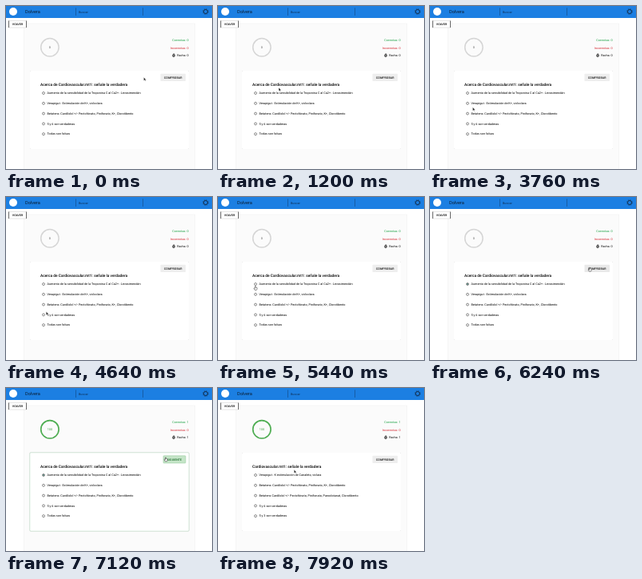
These frames come from a looping animation (258x204 px, 8 s). An HTML page:

```html
<!DOCTYPE html>
<html lang="es">
<head>
<meta charset="utf-8">
<style>
  html, body { margin: 0; width: 100%; height: 100%; overflow: hidden; background: #fff; }
  svg { display: block; width: 100vw; height: 100vh; }
  text { font: 3.8px Roboto, sans-serif; fill: #000; text-rendering: geometricPrecision; }
  .title { font-size: 4.83px; font-weight: 500; }
  .button { font-size: 3.6px; font-weight: 500; letter-spacing: .08px; text-anchor: middle; }
  .count { font-size: 3.75px; text-anchor: end; }
  .card { filter: drop-shadow(0 .6px .6px #0007); }
  .card.right { filter: drop-shadow(0 .6px .6px #1b4a2a88); stroke: #b9dfc0; stroke-width: .4px; }
</style>
</head>
<body>
<svg viewBox="0 0 258 204">
  <rect width="258" height="204" fill="#fff"/>
  <rect x="22.3" y="22" width="214.4" height="190" fill="#fbfbfb" stroke="#f0f0f0" stroke-width=".6"/>

  <rect width="258" height="15" fill="#1c7fe2"/>
  <circle cx="9" cy="7" r="5" fill="#fff"/>
  <text x="24" y="9" style="font-size:5.6px;fill:#0b1d31">Dolvera</text>
  <path d="M87.5 2.4V12M171.5 2.4V12" stroke="#154f8e" stroke-width=".7"/>
  <text x="91" y="8.6" style="fill:#0f2f55">Buscar</text>
  <g fill="none" stroke="#122f50">
    <circle cx="250" cy="7" r="2.5" stroke-width="1"/>
    <circle cx="250" cy="7" r="3.3" stroke-width=".8" stroke-dasharray="1.3 1.29"/>
  </g>

  <rect x="3.5" y="18.5" width="22" height="8.5" fill="#fff" stroke="#ccc" stroke-width=".5"/>
  <path d="M3.5 18.5V27M25.5 18.5V27" stroke="#333" stroke-width=".7"/>
  <text class="button" x="14.5" y="24.2">VOLVER</text>

  <circle cx="54.9" cy="51.8" r="11.2" fill="none" stroke="#d5d5d5" stroke-width="1.5"/>
  <circle id="ring" cx="54.9" cy="51.8" r="11.2" fill="none" stroke="#4caf50" stroke-width="1.6"
          pathLength="100" transform="rotate(-90 54.9 51.8)"/>
  <text id="score" x="54.9" y="53.2" text-anchor="middle"></text>

  <text id="hits" class="count" x="228.5" y="44.4" style="fill:#0f9d3a"></text>
  <text class="count" x="228.5" y="53.5" style="fill:#d3202a">Incorrectas: 0</text>
  <text id="streak" class="count" x="228.5" y="63"></text>
  <path d="M210 59.5c2 1.5 2 4.1 0 4.1s-1.8-2 0-4.1z" fill="#777" stroke="#222" stroke-width=".6"/>

  <rect id="card" class="card" x="30" y="81" width="199" height="98" rx=".8" fill="#fff"/>
  <rect id="action" y="84.8" height="9.2" rx=".8" stroke-width=".5"/>
  <text id="label" class="button" y="90.6"></text>
  <text id="question" class="title" x="43" y="100.1"></text>
  <g id="options"></g>

  <g id="cursor" stroke="#fff" stroke-width=".4" fill="#111">
    <path id="arrow" d="M0 0V4.2L1 3.3 1.7 4.8 2.4 4.5 1.8 3.1H3.1Z"/>
    <path id="hand" d="M-.5 0Q0-.5.5 0V1.5L2.2 2V3.5L1.5 4.8H-.7L-2 2.7-1.4 2.2-.5 2.9Z"
          fill="#fff" stroke="#222" stroke-width=".5"/>
  </g>
</svg>
<script>
const $ = id => document.getElementById(id);
const LOOP = 8000, SELECT = 5520, CHECK = 6560, NEXT = 7280;

const quizzes = [
  ["Acerca de Cardiovascular.mt1: señale la verdadera", [
    "Aumento de la sensibilidad de la Troponina C al Ca2+ : Levosimendán",
    "Verapigut : Estimulación de K+, vicloclara",
    "Betatens: Cardilolol +/- Pectofónato, Pinifonato, K+, Clorotibento",
    "5 y 6 son verdaderas",
    "Todas son falsas"]],
  ["Cardiovascular.mt1: señale la verdadera", [
    "Verapigut : K estimulación de Canaleto, viclara",
    "Betatens: Cardilolol +/- Pectofónato, Pinifonato, K+, Clorotibento",
    "Betatens Cardilolol +/- Pectofónato, Pinifonato, Panodotanat, Clorotibento",
    "5 y 6 son verdaderas",
    "5 y 3 son verdaderas"]]
];

// time, x, y of the pointer tip
const path = [
  [0, 172.5, 89.3], [80, 172, 89.5], [480, 120, 100], [880, 80, 104],
  [1040, 89, 101], [1200, 76, 102.2], [1760, 51, 97], [1840, 51, 98],
  [2640, 56.5, 111.5], [2720, 56.5, 111.7], [3120, 54, 124], [3520, 54, 124],
  [4400, 51, 139.5], [4640, 50.3, 143.5], [5280, 46.8, 112], [5680, 46.8, 111],
  [5760, 46.8, 111], [6160, 200, 88.3], [6240, 200, 88.3], [6640, 200, 87],
  [7280, 200, 87], [7520, 203.5, 88.8], [7920, 95.3, 102.3], [8000, 95.3, 102.3]
];

function pointerAt(t) {
  const i = path.findIndex(key => key[0] > t);
  const [t0, x0, y0] = path[i - 1], [t1, x1, y1] = path[i];
  const p = (t - t0) / (t1 - t0), e = p * p * (3 - 2 * p);
  return [x0 + (x1 - x0) * e, y0 + (y1 - y0) * e];
}

let shown = -1;
function showQuiz(index) {
  if (index === shown) return;
  shown = index;
  const [question, options] = quizzes[index];
  $("question").textContent = question;
  $("options").innerHTML = options.map((text, i) => {
    const y = 109 + i * 12.8;
    return `<circle cx="47" cy="${y}" r="1.5" fill="#fff" stroke="#222" stroke-width=".5"/>
      <text x="51.5" y="${y + 1.2}">${text}</text>`;
  }).join("") + '<circle id="dot" cx="47" cy="109" r=".9" fill="#33695f"/>';
}

function styleButton(right, hover) {
  const x = right ? 197 : 193.5;
  $("action").setAttribute("x", x);
  $("action").setAttribute("width", 225 - x);
  $("action").setAttribute("fill", right ? "#c5e5c8" : hover ? "#e9e9e9" : "#eeeeee");
  $("action").setAttribute("stroke", right ? "#8cc494" : "none");
  $("label").setAttribute("x", (x + 225) / 2);
  $("label").textContent = right ? "SIGUIENTE" : "COMPROBAR";
  $("label").style.fill = right ? "#1b6b2a" : "#111";
}

function draw(now) {
  const t = Math.floor(now % LOOP / 80) * 80;
  const checked = t >= CHECK, right = checked && t < NEXT;
  const [x, y] = pointerAt(t);
  const progress = Math.min(1, Math.max(0, (t - CHECK) / 320));
  const filled = 100 * (1 - (1 - progress) ** 2);
  const overButton = x > 193.5 && x < 225 && y > 85 && y < 94.2 && t > 5760;
  const overRadio = t >= 5280 && t < 5840;

  showQuiz(t < NEXT ? 0 : 1);
  $("dot").style.display = t >= SELECT && t < NEXT ? "" : "none";
  $("ring").setAttribute("stroke-dasharray", `${filled} 100`);
  $("ring").style.display = filled ? "" : "none";
  $("score").textContent = Math.round(filled);
  $("score").style.fill = checked ? "#3fa045" : "#555";
  $("hits").textContent = "Correctas: " + +checked;
  $("streak").textContent = "Racha: " + +checked;

  $("card").classList.toggle("right", right);
  styleButton(right, overButton);

  const hand = overButton || overRadio;
  $("hand").style.display = hand ? "" : "none";
  $("arrow").style.display = hand ? "none" : "";
  $("cursor").setAttribute("transform", `translate(${x} ${y})`);
  requestAnimationFrame(() => draw(performance.now() - start));
}

const start = performance.now();
draw(0);
</script>
</body>
</html>
```
